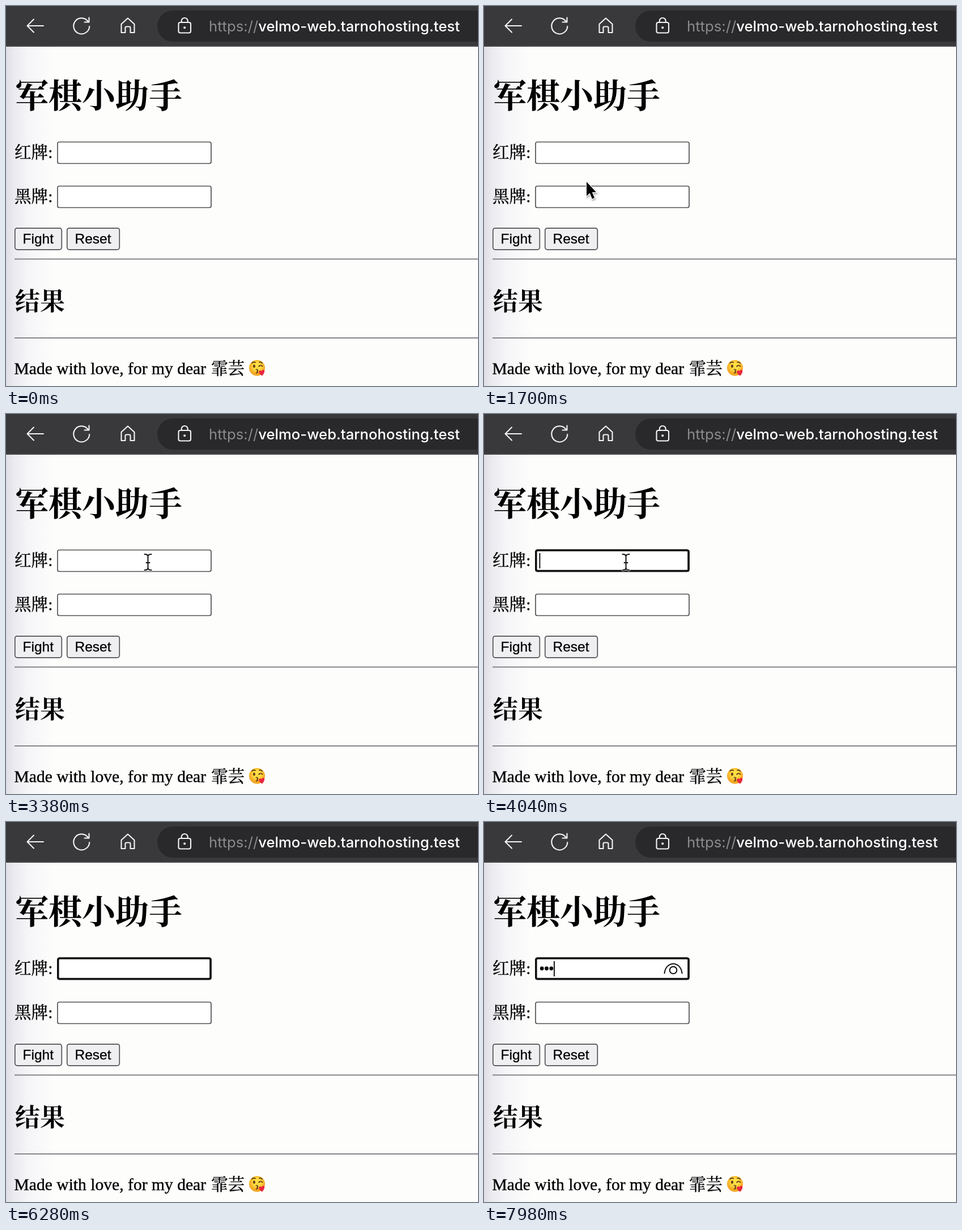
An HTML page for the animation above (8 s loop, 833x672 px).

```html
<!DOCTYPE html>
<html lang="zh">
<head>
<meta charset="utf-8">
<title>军棋小助手</title>
<style>
  html, body { margin: 0; width: 100%; height: 100%; overflow: hidden; background: #fdfdfc; }
  svg { display: block; width: 100vw; height: 100vh; }
  text { white-space: pre; }
  .serif { font-family: "Liberation Serif", "Noto Serif CJK SC", "Noto Sans CJK SC", "Noto Sans CJK", serif; font-size: 29.6px; stroke: #000; stroke-width: .4; }
  .heading { font-weight: bold; stroke: none; }
  .button { font: 24.5px "Liberation Sans", sans-serif; stroke: #000; stroke-width: .3; }
  .address { font: 25.7px Inter, sans-serif; fill: #8b8b8d; }
  .host { font-weight: 500; fill: #fff; }
  .icon { fill: none; stroke: #f4f4f4; stroke-width: 2.1; stroke-linecap: round; stroke-linejoin: round; }
  .line { fill: none; stroke: #111; stroke-width: 2; stroke-linecap: round; }
  .halo { fill: none; stroke: #fff; stroke-width: 3.6; stroke-linecap: round; }
</style>
</head>
<body>
<svg viewBox="0 0 833 672" preserveAspectRatio="none">
  <defs>
    <linearGradient id="edge">
      <stop offset="0" stop-color="#dedee4"/>
      <stop offset=".18" stop-color="#ebebf0"/>
      <stop offset=".45" stop-color="#f5f5f8"/>
      <stop offset="1" stop-color="#fdfdfc"/>
    </linearGradient>
    <radialGradient id="face" cy=".4">
      <stop offset=".4" stop-color="#ffdf45"/>
      <stop offset="1" stop-color="#f3a623"/>
    </radialGradient>
    <filter id="shadow" x="-50%" y="-50%" width="200%" height="200%">
      <feDropShadow dx="1" dy="2" stdDeviation="1.6" flood-opacity=".4"/>
    </filter>
    <path id="beamShape" d="M-6 -14Q0 -14 0 -10Q0 -14 6 -14M0 -10V10M-6 14Q0 14 0 10Q0 14 6 14M-3 1H3"/>
  </defs>

  <rect width="833" height="672" fill="#fdfdfc"/>
  <rect y="71" width="84" height="601" fill="url(#edge)"/>

  <!-- Browser toolbar -->
  <rect width="833" height="71.5" fill="#39393c"/>
  <rect y="70" width="833" height="2" fill="#4a4a4d"/>
  <rect x="267" y="8" width="620" height="55" rx="27.5" fill="#29292b"/>
  <g class="icon">
    <path d="M66 35H38M49 23.5L37.5 35L49 46.5"/>
    <path d="M144.5 27A14 14 0 1 0 147.3 36M146.5 20.5V28.5H138.5"/>
    <path d="M203.5 32L215 21.5L226.5 32V47H219.5V38.5Q219.5 36.5 217.5 36.5H212.5Q210.5 36.5 210.5 38.5V47H203.5Z"/>
    <rect x="304.5" y="29" width="21.5" height="18.5" rx="3"/>
    <path d="M309.7 29V26.5A5.5 5.5 0 0 1 320.7 26.5V29"/>
    <circle cx="315.2" cy="38.3" r="1" fill="#f4f4f4"/>
  </g>
  <text class="address" x="358" y="44.5">https://<tspan class="host">velmo-web.tarnohosting.test</tspan></text>

  <!-- Page -->
  <text class="serif heading" x="16" y="180" style="font-size:59px">军棋小助手</text>
  <text class="serif" x="15" y="269">红牌:</text>
  <text class="serif" x="15" y="347">黑牌:</text>
  <g fill="#fff" stroke="#505053" stroke-width="1.7">
    <rect x="91" y="240.5" width="271" height="38" rx="3"/>
    <rect x="91" y="318.5" width="271" height="38" rx="3"/>
    <g fill="#efeff1">
      <rect x="15.8" y="392.8" width="82.5" height="38" rx="4"/>
      <rect x="107.8" y="392.8" width="92.5" height="38" rx="4"/>
    </g>
  </g>
  <rect id="focusRing" x="91.8" y="241" width="269.2" height="36.5" rx="3" fill="#fff" stroke="#101010" stroke-width="3.6"/>
  <text class="button" x="29.5" y="419.5">Fight</text>
  <text class="button" x="121.5" y="419.5">Reset</text>
  <path d="M15 447.5H833M15 587H833" stroke="#85858a" stroke-width="2"/>
  <text class="serif heading" x="16" y="538" style="font-size:44px">结果</text>
  <text class="serif" x="14.5" y="651">Made with love, for my dear</text>
  <text class="serif" x="362" y="651">霏芸</text>
  <g>
    <circle cx="443" cy="640" r="14" fill="url(#face)"/>
    <ellipse cx="438" cy="637" rx="1.9" ry="2.8" fill="#5b3512"/>
    <g fill="none" stroke="#5b3512" stroke-width="1.7" stroke-linecap="round">
      <path d="M446 637.5Q449 634 452.5 637M434 631.5Q437 628.5 440 630.5M447 630Q450 629 452 631.5"/>
      <path d="M441.5 642.5Q446.5 643 443 645.8Q446.5 648.5 441.5 649"/>
    </g>
    <path d="M452 654C443 649 446 642 451 645.5C455 640 460 646 452 654Z" fill="#e9273e"/>
  </g>

  <!-- Field contents -->
  <g id="dots"><circle cx="102.2" cy="259" r="3.4"/><circle cx="110.5" cy="259" r="3.4"/><circle cx="118.8" cy="259" r="3.4"/></g>
  <rect id="caret" y="246" width="1.8" height="27"/>
  <g id="eye" class="line">
    <path d="M318.5 267.5C321 245 347 245 349.5 267.5"/>
    <circle cx="334" cy="262" r="6.3"/>
  </g>

  <!-- Pointers -->
  <path id="arrow" filter="url(#shadow)" d="M0 0V25L5.6 19.8L10 30L14 28.3L9.7 18.3H17Z" stroke="#fff" stroke-width="2.4" paint-order="stroke"/>
  <g id="beam">
    <use href="#beamShape" class="halo"/>
    <use href="#beamShape" class="line"/>
  </g>
</svg>
<script>
const LOOP = 8000, FOCUS = 3640, BLINK = 500;
const BEAM_START = 2880, BEAM_END = 5400;
const KEYS = [6420, 7000, 7540];
// Pointer stops: time, x, y
const PATH = [[340, 850, 640], [760, 530, 543], [840, 530, 543], [1600, 181, 311],
              [2480, 181, 311], [2820, 188, 261], [3300, 250.5, 262]];

const $ = id => document.getElementById(id);
const show = (node, on) => { node.style.display = on ? "" : "none"; };
const ease = p => p * p * (3 - 2 * p);

function pointerAt(t) {
  const next = PATH.findIndex(stop => stop[0] > t);
  if (next < 0) return PATH[PATH.length - 1].slice(1);
  if (next === 0) return PATH[0].slice(1);
  const [t0, x0, y0] = PATH[next - 1], [t1, x1, y1] = PATH[next];
  const p = ease((t - t0) / (t1 - t0));
  return [x0 + (x1 - x0) * p, y0 + (y1 - y0) * p];
}

function render(t) {
  const focused = t >= FOCUS;
  const typed = KEYS.filter(key => t >= key).length;
  const lastAction = typed ? KEYS[typed - 1] : FOCUS;
  const place = `translate(${pointerAt(t)})`;

  show($("focusRing"), focused);
  [...$("dots").children].forEach((dot, i) => show(dot, i < typed));
  show($("eye"), typed > 0);
  show($("caret"), focused && Math.floor((t - lastAction) / BLINK) % 2 === 0);
  $("caret").setAttribute("x", 97.5 + typed * 8.5);

  $("arrow").setAttribute("transform", place);
  $("beam").setAttribute("transform", place);
  show($("arrow"), t >= PATH[0][0] && t < BEAM_START);
  show($("beam"), t >= BEAM_START && t < BEAM_END);
}

const start = performance.now();
function tick() {
  render((performance.now() - start) % LOOP);
  requestAnimationFrame(tick);
}
tick();
</script>
</body>
</html>
```
